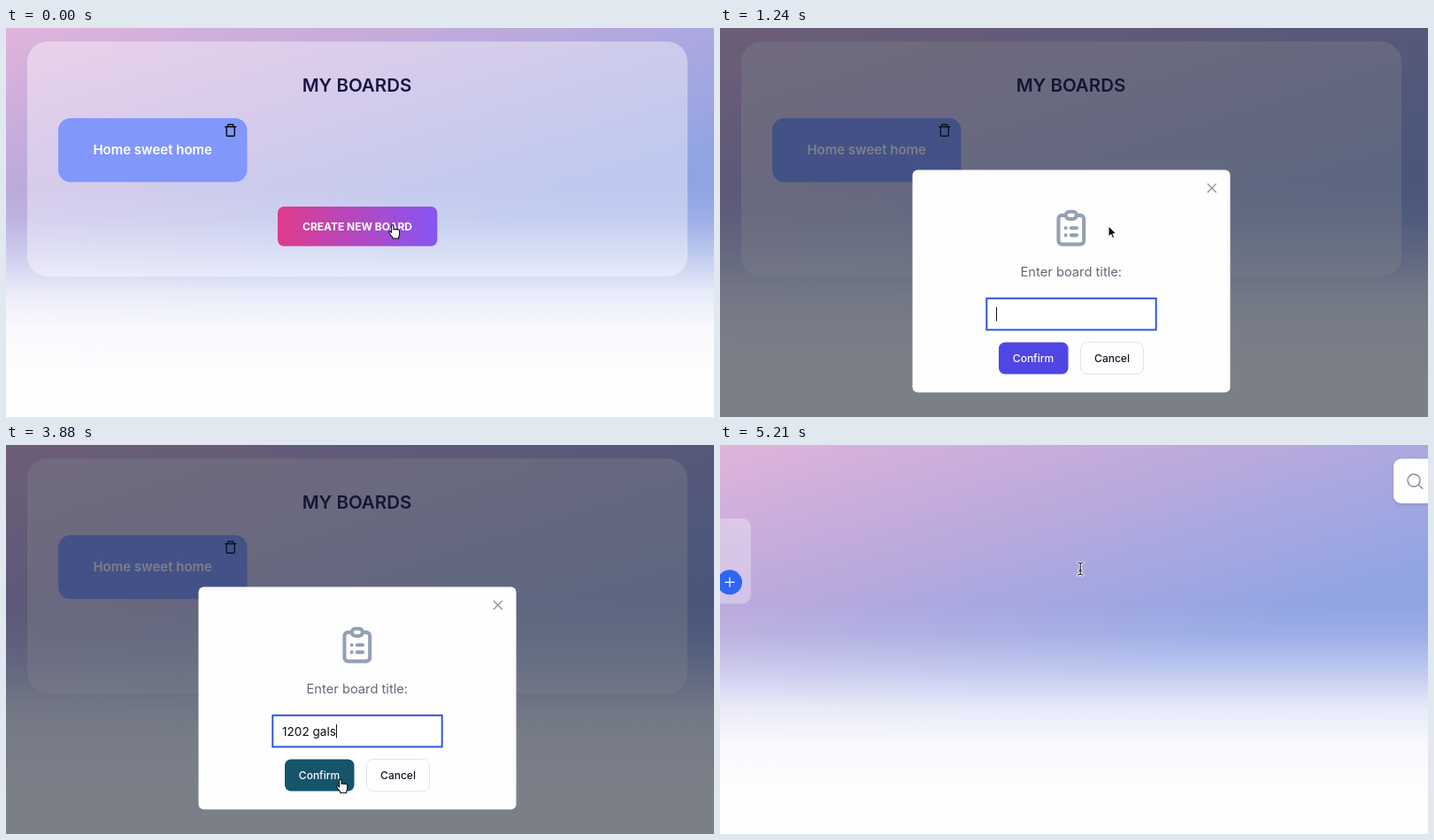
An HTML page for the animation above (5.24 s loop, 800 by 440 pixels).

```html
<!DOCTYPE html>
<html lang="en">
<head>
<meta charset="utf-8">
<title>My boards</title>
<style>
html, body { margin: 0; width: 100%; height: 100%; overflow: hidden; background: #fff; }
svg { display: block; width: 800px; height: 440px; }
text { font-family: Inter, "Open Sans", sans-serif; text-anchor: middle; white-space: pre; }
.line { fill: none; stroke-linecap: round; stroke-linejoin: round; }
#typed { text-anchor: start; }
</style>
</head>
<body>
<svg viewBox="0 0 800 440">
  <defs>
    <linearGradient id="sky" gradientUnits="userSpaceOnUse" x1="0" y1="0" x2="115" y2="365">
      <stop stop-color="#e0b4da"/>
      <stop offset=".29" stop-color="#c8addc"/>
      <stop offset=".5" stop-color="#b9a9dd"/>
      <stop offset=".65" stop-color="#aba8e0"/>
      <stop offset="1" stop-color="#90a4e3"/>
    </linearGradient>
    <linearGradient id="fade" gradientUnits="userSpaceOnUse" x1="0" y1="180" x2="0" y2="390">
      <stop stop-color="#fefdff" stop-opacity="0"/>
      <stop offset=".17" stop-color="#fefdff" stop-opacity=".12"/>
      <stop offset=".35" stop-color="#fefdff" stop-opacity=".4"/>
      <stop offset=".57" stop-color="#fefdff" stop-opacity=".8"/>
      <stop offset=".76" stop-color="#fefdff" stop-opacity=".95"/>
      <stop offset="1" stop-color="#fefdff"/>
    </linearGradient>
    <linearGradient id="idle">
      <stop stop-color="#8655f5"/><stop offset="1" stop-color="#df3b8c"/>
    </linearGradient>
    <linearGradient id="hot">
      <stop stop-color="#df3b8c"/><stop offset="1" stop-color="#8655f5"/>
    </linearGradient>
    <filter id="soft" x="-20%" y="-20%" width="140%" height="140%">
      <feDropShadow dx="0" dy="1" stdDeviation="2" flood-opacity=".15"/>
    </filter>
    <g id="card">
      <rect x="59" y="102" width="213.5" height="72.3" rx="14" fill="#8197fc"/>
      <path class="line" stroke="#080810" stroke-width="1.4"
        d="M247.7 111.7H259.8M250.8 111.5V109.2H256.8V111.5M249.2 112V121q0 1.2 1.2 1.2H257.1q1.2 0 1.2-1.2V112"/>
    </g>
  </defs>

  <rect width="800" height="440" fill="url(#sky)"/>
  <rect width="800" height="440" fill="url(#fade)"/>

  <g id="boards">
    <rect x="24" y="15.3" width="746" height="266" rx="23" fill="#fff" fill-opacity=".4"/>
    <text x="396.5" y="71.8" font-size="20.5" font-weight="600" fill="#17153f">MY BOARDS</text>
    <g fill="#fff" font-size="15" font-weight="600">
      <use href="#card"/>
      <text x="165.7" y="143.4">Home sweet home</text>
      <g id="added">
        <use href="#card" x="231.4"/>
        <text x="397" y="143.4">1202 gals</text>
      </g>
    </g>
    <rect id="create" x="307" y="202" width="180.3" height="44.7" rx="7"/>
    <text x="397" y="228.8" font-size="12" font-weight="700" fill="#fff">CREATE NEW BOARD</text>
  </g>

  <g id="board">
    <g id="list">
      <rect x="-200" y="83" width="235" height="96.5" rx="10" fill="#fff" fill-opacity=".3"/>
      <circle cx="11" cy="155.3" r="14" fill="#2f66f3"/>
      <path class="line" stroke="#dfe6ff" stroke-width="1.4" d="M6 155.3H16M11 150.3V160.3"/>
    </g>
    <g id="search">
      <rect x="761" y="15.5" width="240" height="50.5" rx="9" fill="#fff" filter="url(#soft)"/>
      <path class="line" stroke="#858b9b" stroke-width="1.4" d="M791 40a7 7 0 1 0-14 0a7 7 0 1 0 14 0M789.2 45L793.8 49.2"/>
    </g>
  </g>

  <rect id="shade" width="800" height="440" fill="#111827" fill-opacity=".55"/>
  <g id="modal">
    <rect x="217.5" y="160.5" width="359" height="251.8" rx="6" fill="#fffeff"/>
    <path class="line" stroke="#8c94a3" stroke-width="1.4" d="M551.2 176.6L560.4 185.8M560.4 176.6L551.2 185.8"/>
    <path class="line" stroke="#94a0b4" stroke-width="2" transform="translate(372.2 201.6) scale(2.05)"
      d="M9 5H7a2 2 0 0 0-2 2v12a2 2 0 0 0 2 2h10a2 2 0 0 0 2-2V7a2 2 0 0 0-2-2h-2M9 5a2 2 0 0 0 2 2h2a2 2 0 0 0 2-2M9 5a2 2 0 0 1 2-2h2a2 2 0 0 1 2 2m-3 7h3m-3 4h3m-6-4h.01M9 16h.01"/>
    <text x="396.8" y="281" font-size="14.7" fill="#626878">Enter board title:</text>
    <rect x="301.3" y="305.8" width="191.4" height="35.6" fill="#fff" stroke="#2f55dc" stroke-width="2"/>
    <text id="typed" x="312" y="328.7" font-size="13.6" fill="#0c0d14"></text>
    <path id="caret" stroke="#0c0d14" d="M.5 316V331.5"/>
    <g font-size="12" font-weight="500">
      <rect id="confirm" x="315" y="355.5" width="78.5" height="36" rx="7"/>
      <text x="354" y="377.8" fill="#fff">Confirm</text>
      <rect x="407.5" y="355.5" width="71" height="36" rx="7" fill="#fff" stroke="#e1e4ec"/>
      <text x="443" y="377.8" fill="#111827">Cancel</text>
    </g>
  </g>

  <g id="cursor">
    <path id="arrow" fill="#0b0b10" stroke="#fff" stroke-width="1"
      d="M0 0V12L2.8 9.5L4.6 13.6L6.6 12.7L4.9 8.8H8.6Z"/>
    <path id="hand" fill="#fff" stroke="#111" stroke-width="1.1" stroke-linejoin="round"
      d="M-3.4 -.2a1.2 1.2 0 0 1 2.4 0V4.2q.3-1 1.2-1t1.2 1q.3-.8 1.1-.8t1.1 1q.2-.6 1-.6t1 1.2V9q0 2-1 3.4V14H-2.2V12.6Q-5 10-6 7.6t1-1.6L-3.4 7.4Z"/>
    <g id="beam" class="line">
      <path id="stem" stroke="#fff" stroke-width="2.6" d="M-2.8-7Q0-7 .2-5.5Q.4-7 3.2-7M.2-5.5V5.5M-2.8 7Q0 7 .2 5.5Q.4 7 3.2 7M-1.6 2H2"/>
      <use href="#stem"/>
      <path stroke="#111" stroke-width="1.1" d="M-2.8-7Q0-7 .2-5.5Q.4-7 3.2-7M.2-5.5V5.5M-2.8 7Q0 7 .2 5.5Q.4 7 3.2 7M-1.6 2H2"/>
    </g>
  </g>
</svg>
<script>
const LOOP = 5240, OPEN = 610, CLOSE = 4030, ADDED = 4120, LEAVE = 5030;
const TITLE = '1202 gals';
const KEYS = [2260, 2400, 2530, 2660, 2820, 3030, 3140, 3250, 3360];
const PATH = [[0, 439, 224], [3400, 439, 224], [3850, 380, 379.5], [4390, 380, 379.5], [4890, 407, 140], [LOOP, 407, 140]];

const $ = id => document.getElementById(id);
const ramp = (t, a, b) => Math.min(1, Math.max(0, (t - a) / (b - a)));
const smooth = u => u * u * (3 - 2 * u);
const easeOut = u => 1 - (1 - u) ** 2;
const set = (id, name, value) => $(id).setAttribute(name, value);
const show = (id, on) => set(id, 'visibility', on ? 'visible' : 'hidden');

function pointer(t) {
  const i = PATH.findIndex(p => p[0] > t) - 1;
  const [t0, x0, y0] = PATH[i], [t1, x1, y1] = PATH[i + 1];
  const u = smooth(ramp(t, t0, t1));
  return [x0 + (x1 - x0) * u, y0 + (y1 - y0) * u];
}

function drawModal(t, onConfirm) {
  const open = easeOut(ramp(t, OPEN, OPEN + 300));
  const closing = ramp(t, CLOSE, CLOSE + 200) ** 2;
  const seen = open * (1 - closing), scale = .95 + .05 * seen;
  set('shade', 'opacity', seen);
  set('modal', 'opacity', seen);
  set('modal', 'transform', `translate(397 286.4) scale(${scale}) translate(-397 -286.4)`);

  const count = KEYS.filter(k => k <= t).length;
  $('typed').textContent = TITLE.slice(0, count);
  const since = t - (count ? KEYS[count - 1] : 1060);
  show('caret', since % 1000 < 540);
  set('caret', 'transform', `translate(${312 + (count ? $('typed').getComputedTextLength() : 0)} 0)`);
  set('confirm', 'fill', onConfirm ? '#15546a' : '#4f46e5');
}

function draw(t) {
  const [x, y] = pointer(t);
  const modal = t >= OPEN && t < CLOSE + 200, board = t >= LEAVE;
  const onCreate = !modal && y > 202 && y < 246.7;
  const onCard = !modal && !board && y > 102 && y < 174.3;
  const onConfirm = modal && y > 372;

  show('boards', !board);
  set('added', 'opacity', +(t >= ADDED));
  set('create', 'fill', onCreate || t < OPEN + 30 ? 'url(#hot)' : 'url(#idle)');

  show('board', board);
  const away = 60 * (1 - easeOut(ramp(t, LEAVE + 30, 5210)));
  set('list', 'transform', `translate(${-away} 0)`);
  set('search', 'transform', `translate(${away} 0)`);

  drawModal(t, onConfirm);

  const hand = onCreate || onCard || (onConfirm && t < CLOSE);
  set('cursor', 'transform', `translate(${x} ${y})`);
  show('hand', hand);
  show('beam', board);
  show('arrow', !hand && !board);
}

function tick() {
  draw(performance.now() % LOOP);
  requestAnimationFrame(tick);
}
tick();
</script>
</body>
</html>
```
